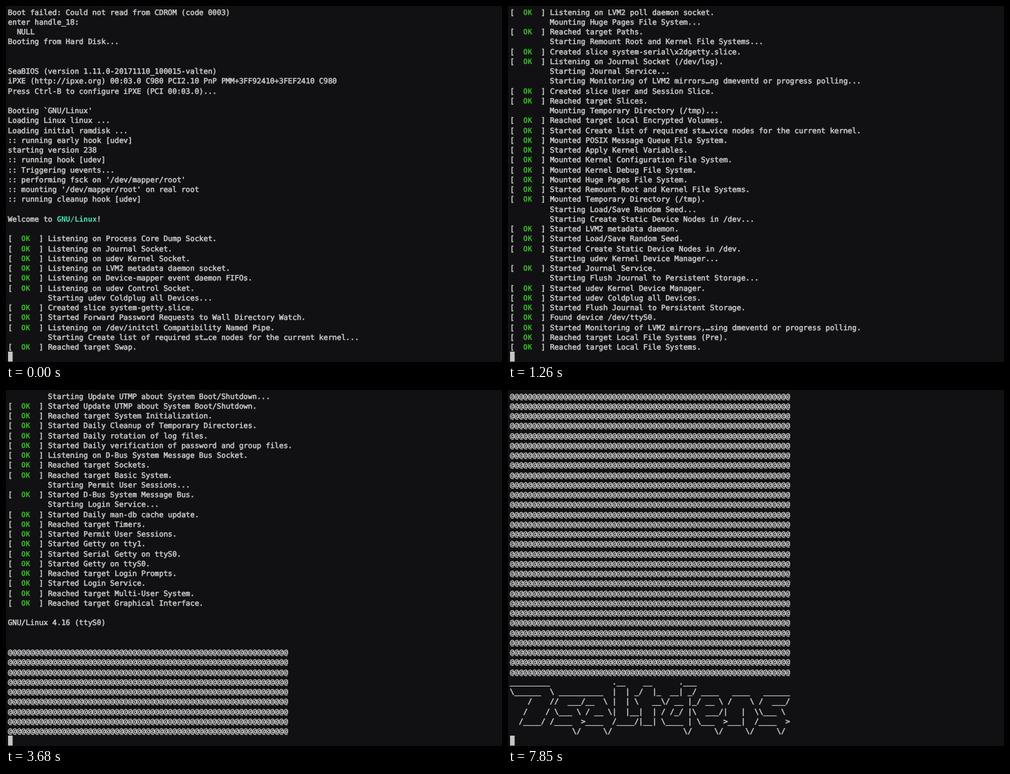
Animation of 717x515 px, one loop 8180 ms. Source, as an HTML page:

```html
<!DOCTYPE html>
<html lang="en">
<head>
<meta charset="utf-8">
<title>Boot log</title>
<style>
  html, body { margin: 0; width: 100%; height: 100%; overflow: hidden; background: #111113; }
  svg { display: block; width: 717px; height: 515px; }
  text {
    font: 10.68px "DejaVu Sans Mono", monospace;
    white-space: pre;
    text-rendering: geometricPrecision;
    fill: #cacaca; stroke: #cacaca; stroke-width: .5px;
  }
  .ok, .os { font-weight: bold; stroke: none; }
  .ok { fill: #35b824; }
  .os { fill: #48e5b0; }
</style>
</head>
<body>
<svg id="term" viewBox="0 0 717 515">
  <rect width="717" height="515" fill="#111113"/>
  <g id="log"></g>
  <rect id="cursor" x="3" y="500" width="6.6" height="14.4" fill="#c6c6c6"/>
</svg>
<script>
const LOOP = 8180, ROWS = 35, PITCH = 14.25, LEFT = 2.8, BASE = 12.5;
const NS = "http://www.w3.org/2000/svg";

// "+" marks a finished unit, "-" an indented one.
const boot = String.raw`Boot failed: Could not read from CDROM (code 0003)
enter handle_18:
  NULL
Booting from Hard Disk...


SeaBIOS (version 1.11.0-20171110_100015-valten)
iPXE (http://ipxe.org) 00:03.0 C980 PCI2.10 PnP PMM+3FF92410+3FEF2410 C980
Press Ctrl-B to configure iPXE (PCI 00:03.0)...

Booting ${"`"}GNU/Linux'
Loading Linux linux ...
Loading initial ramdisk ...
:: running early hook [udev]
starting version 238
:: running hook [udev]
:: Triggering uevents...
:: performing fsck on '/dev/mapper/root'
:: mounting '/dev/mapper/root' on real root
:: running cleanup hook [udev]

Welcome to GNU/Linux!

+Listening on Process Core Dump Socket.
+Listening on Journal Socket.
+Listening on udev Kernel Socket.
+Listening on LVM2 metadata daemon socket.
+Listening on Device-mapper event daemon FIFOs.
+Listening on udev Control Socket.
-Starting udev Coldplug all Devices...
+Created slice system-getty.slice.
+Started Forward Password Requests to Wall Directory Watch.
+Listening on /dev/initctl Compatibility Named Pipe.
-Starting Create list of required st…ce nodes for the current kernel...
+Reached target Swap.
+Started Dispatch Password Requests to Console Directory Watch.
+Set up automount Arbitrary Executab…rmats File System Automount Point.
-Mounting POSIX Message Queue File System...
-Starting Apply Kernel Variables...
-Mounting Kernel Configuration File System...
-Mounting Kernel Debug File System...
+Reached target Remote File Systems.
+Listening on LVM2 poll daemon socket.
-Mounting Huge Pages File System...
+Reached target Paths.
-Starting Remount Root and Kernel File Systems...
+Created slice system-serial\x2dgetty.slice.
+Listening on Journal Socket (/dev/log).
-Starting Journal Service...
-Starting Monitoring of LVM2 mirrors…ng dmeventd or progress polling...
+Created slice User and Session Slice.
+Reached target Slices.
-Mounting Temporary Directory (/tmp)...
+Reached target Local Encrypted Volumes.
+Started Create list of required sta…vice nodes for the current kernel.
+Mounted POSIX Message Queue File System.
+Started Apply Kernel Variables.
+Mounted Kernel Configuration File System.
+Mounted Kernel Debug File System.
+Mounted Huge Pages File System.
+Started Remount Root and Kernel File Systems.
+Mounted Temporary Directory (/tmp).
-Starting Load/Save Random Seed...
-Starting Create Static Device Nodes in /dev...
+Started LVM2 metadata daemon.
+Started Load/Save Random Seed.
+Started Create Static Device Nodes in /dev.
-Starting udev Kernel Device Manager...
+Started Journal Service.
-Starting Flush Journal to Persistent Storage...
+Started udev Kernel Device Manager.
+Started udev Coldplug all Devices.
+Started Flush Journal to Persistent Storage.
+Found device /dev/ttyS0.
+Started Monitoring of LVM2 mirrors,…sing dmeventd or progress polling.
+Reached target Local File Systems (Pre).
+Reached target Local File Systems.
-Starting Create Volatile Files and Directories...
+Started Create Volatile Files and Directories.
-Starting Update UTMP about System Boot/Shutdown...
+Started Update UTMP about System Boot/Shutdown.
+Reached target System Initialization.
+Started Daily Cleanup of Temporary Directories.
+Started Daily rotation of log files.
+Started Daily verification of password and group files.
+Listening on D-Bus System Message Bus Socket.
+Reached target Sockets.
+Reached target Basic System.
-Starting Permit User Sessions...
+Started D-Bus System Message Bus.
-Starting Login Service...
+Started Daily man-db cache update.
+Reached target Timers.
+Started Permit User Sessions.
+Started Getty on tty1.
+Started Serial Getty on ttyS0.
+Started Getty on ttyS0.
+Reached target Login Prompts.
+Started Login Service.
+Reached target Multi-User System.
+Reached target Graphical Interface.

GNU/Linux 4.16 (ttyS0)

`.split("\n");

const block = Array(31).fill("@".repeat(63));

const banner = String.raw`_________              .__    __      .___
\______  \ __________  |  | _/  |_  __| _/ ____   ____   ______
    /    //  ___/__  \ |  | \   __\/ __ |_/ __ \ /    \ /  ___/
   /    / \___ \ / __ \|  |__|  | / /_/ |\  ___/|   |  \\___ \
  /____/ /____  >____  /____/|__| \____ | \___  >___|  /____  >
              \/     \/                \/     \/     \/     \/`.split("\n");

// Output pace: [start ms, end ms, lines before, lines after]
const pace = [
  [0, 760, 0, 25], [760, 1260, 25, 42], [1260, 2110, 42, 65],
  [2510, 2510, 66, 66], [2610, 2610, 67, 67], [2830, 2830, 68, 68],
  [3330, 3680, 69, 79], [3680, 4530, 79, 103], [4690, 4690, 107, 107]
];
const blinks = [5310, 6160, 7000, 7850];

const log = document.getElementById("log");
const cursor = document.getElementById("cursor");

function span(parent, str, cls) {
  const s = document.createElementNS(NS, "tspan");
  s.textContent = str;
  if (cls) s.setAttribute("class", cls);
  parent.appendChild(s);
}

function makeLine(str, i) {
  const el = document.createElementNS(NS, "text");
  el.setAttribute("x", LEFT);
  el.setAttribute("y", BASE + i * PITCH);
  if (str[0] === "+") {
    span(el, "[  ");
    span(el, "OK", "ok");
    span(el, "  ] " + str.slice(1));
  } else if (str[0] === "-") {
    span(el, " ".repeat(9) + str.slice(1));
  } else if (str.startsWith("Welcome")) {
    span(el, "Welcome to ");
    span(el, "GNU/Linux", "os");
    span(el, "!");
  } else {
    span(el, str);
  }
  log.appendChild(el);
  return el;
}

const lines = [...boot, ...block, ...banner].map(makeLine);

// Lines scrolled off the top; the screen refreshes every 50 ms.
function scrolled(t) {
  const q = t < 400 ? Math.floor(t / 50) * 50 : Math.floor((t - 10) / 50) * 50 + 10;
  let n = 0;
  for (const [start, end, from, to] of pace) {
    if (t < start) break;
    const k = end > start ? Math.min(1, Math.max(0, (q - start) / (end - start))) : 1;
    n = Math.floor(from + (to - from) * k + 1e-6);
  }
  return n;
}

let shownTop = -1;
function draw(t) {
  const top = scrolled(t);
  if (top !== shownTop) {
    shownTop = top;
    log.setAttribute("transform", `translate(0 ${-top * PITCH})`);
    lines.forEach((el, i) => {
      el.style.display = i >= top && i < top + ROWS ? "" : "none";
    });
  }
  const flips = blinks.filter(b => t >= b).length;
  cursor.style.display = flips % 2 ? "none" : "";
}

const began = performance.now();
function tick() {
  draw((performance.now() - began) % LOOP);
  requestAnimationFrame(tick);
}
tick();
</script>
</body>
</html>
```
